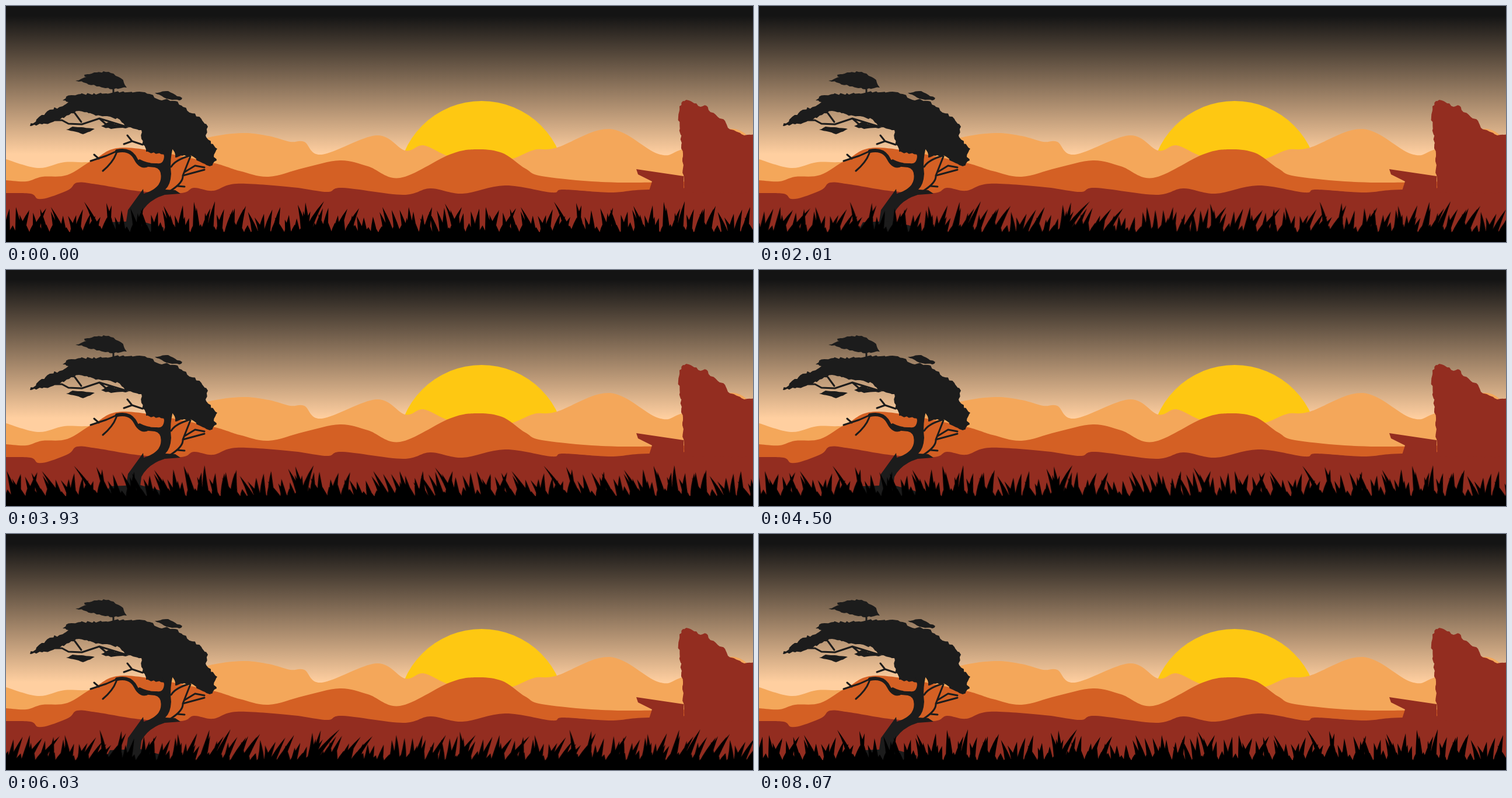
These frames come from a looping animation (1280x405 px, 8100 ms). An HTML page:

```html
<!DOCTYPE html>
<html lang="en">
<head>
<meta charset="utf-8">
<title>Savanna sunset</title>
<style>
  html, body { margin: 0; width: 100%; height: 100%; overflow: hidden; background: #000; }
  svg { display: block; width: 100%; height: 100%; }
  #tree { fill: #1c1c1c; }
  .twigs { fill: none; stroke: #1c1c1c; stroke-width: 3; stroke-linecap: round; stroke-linejoin: round; }
  #grass { transform-origin: 0 420px; animation: sway 8100ms -7990ms ease infinite; }
  @keyframes sway {
    0%, 100% { transform: skewX(0deg); }
    25% { transform: skewX(-14.6deg); }
    50% { transform: skewX(12deg); }
    75% { transform: skewX(-17.6deg); }
  }
</style>
</head>
<body>
<svg viewBox="0 0 1280 405" preserveAspectRatio="none">
  <defs>
    <linearGradient id="sky" gradientUnits="userSpaceOnUse" x1="0" y1="17" x2="0" y2="254">
      <stop offset="0" stop-color="#141414"/>
      <stop offset="1" stop-color="#ffcfa0"/>
    </linearGradient>
  </defs>
  <rect width="1280" height="405" fill="url(#sky)"/>
  <circle cx="815" cy="307" r="144" fill="#fec812"/>
  <path id="far" fill="#f4a75a"/>
  <path id="mid" fill="#d46024"/>
  <g fill="#932d20">
    <path id="near"/>
    <path id="rock"/>
    <path d="M1080 280L1161 292V320H1101L1107 301L1083 289Z"/>
  </g>

  <g id="tree">
    <path id="canopy"/>
    <path id="crown"/>
    <path id="tuft"/>
    <path id="spray"/>
    <path id="sprig"/>
    <path d="M204 382L209 350L235 314L236 322Q262 314 265 298Q268 280 255 277Q236 277 224 266L229 263
      Q244 271 259 270Q270 272 271 258L267 240H287Q280 262 283 288Q282 307 273 315L290 316L299 322
      L272 324Q243 333 232 355L228 386Z"/>
    <path d="M160 405L178 371L230 369L270 380V405Z"/>
    <g class="twigs">
      <path stroke-width="6" d="M190 249Q213 244 222 262T245 272"/>
      <path d="M145 266L172 257L190 249Q186 266 166 283M151 255L159 262M184 141V151"/>
      <path d="M282 317Q304 303 303 291L316 258M303 291L340 281M306 285L324 274L340 277"/>
      <path d="M283 276Q290 264 315 257M294 309L306 310M202 237L216 232L234 238M208 222L216 232"/>
      <path d="M75 196H96L107 202L130 203L160 193L206 207M118 184L129 199M160 193L176 207"/>
    </g>
  </g>

  <g id="grass">
    <rect x="-300" y="388" width="1900" height="40"/>
    <path id="turf"/>
    <use href="#turf" x="805"/>
    <use href="#turf" x="-805"/>
  </g>
</svg>

<script>
const set = (id, d) => document.getElementById(id).setAttribute('d', d);
const parse = text => text.trim().split(/\s+/).map(p => p.split(',').map(Number));

let seed = 41;
const rand = () => (seed = (seed * 16807) % 2147483647) / 2147483647;

// Smooth skyline through a few points, filled down to the ground.
function ridge(text) {
  const p = parse(text), k = .17;
  let d = `M-9 405L${p[0]}`;
  for (let i = 0; i < p.length - 1; i++) {
    const a = p[i - 1] || p[i], b = p[i], c = p[i + 1], e = p[i + 2] || c;
    d += `C${b[0] + (c[0] - a[0]) * k} ${b[1] + (c[1] - a[1]) * k} `
       + `${c[0] - (e[0] - b[0]) * k} ${c[1] - (e[1] - b[1]) * k} ${c}`;
  }
  return d + 'V405Z';
}

// Closed outline with small random nicks along each edge.
function ragged(text, size) {
  const p = parse(text);
  return 'M' + p.map(([x, y], i) => {
    const [u, v] = p[(i + 1) % p.length];
    const steps = Math.ceil(Math.hypot(u - x, v - y) / 5);
    let d = '';
    for (let s = 0; s < steps; s++) {
      const t = s / steps, nick = () => s ? (rand() - .5) * size : 0;
      d += `${x + (u - x) * t + nick()} ${y + (v - y) * t + nick()} `;
    }
    return d;
  }).join('L') + 'Z';
}

set('far', ridge(`0,263 55,278 100,268 150,267 260,251 345,226 405,218 450,223 487,233 511,233
  541,255 635,222 684,248 715,239 756,257 815,275 868,262 905,247 944,243 1035,211 1118,254
  1158,246 1240,211 1280,230`));
set('mid', ridge(`0,299 35,301 62,293 105,290 150,264 205,243 345,267 400,283 450,293 510,278
  572,265 620,275 675,295 760,255 805,246 850,252 890,279 925,293 1060,303 1280,297`));
set('near', ridge(`0,321 42,322 55,331 75,328 108,315 122,303 155,306 230,318 300,321 322,312
  355,317 395,305 490,311 550,319 577,312 680,324 727,313 782,322 855,308 935,320 955,315
  1037,320 1102,315 1280,315`));

set('rock', ragged(`1161,320 1160,258 1152,190 1154,172 1160,163 1170,162 1190,173 1200,171
  1207,182 1232,197 1237,209 1265,222 1290,219 1290,320`, 3));
set('canopy', ragged(`41,206 57,190 75,178 97,172 107,165 97,162 112,153 185,148 238,148 258,159
  290,163 303,173 335,194 346,207 343,225 362,245 356,259 361,265 349,275 316,256 290,260 284,244
  272,255 240,250 232,228 232,213 205,208 195,195 150,186 125,180 108,187 90,196 62,203`, 4));
set('crown', ragged('119,128 138,122 134,118 156,114 176,113 197,124 207,140 183,143 160,138', 3));
set('tuft', ragged('255,149 278,146 302,158 297,162 275,159', 2));
set('spray', ragged('103,212 114,207 152,211 132,220', 2));
set('sprig', ragged('163,206 176,199 214,209 180,211', 2));

// Curved blade: tip, sideways lean from the root, half width.
function blade(x, y, lean, w) {
  const root = x - lean, bend = root + lean * .28, half = (y + 391) / 2;
  return `M${root - w} 391Q${bend - w * .72} ${half} ${x} ${y}`
       + `Q${bend + w * .72} ${half + 3} ${root + w} 391Z`;
}

// The most striking blades; the rest fill the row at random.
const tall = parse(`17,345,-5 40,350,14 69,347,20 77,345,-19 134,336,-25 172,338,-9 181,342,8
  235,346,10 270,343,-16 303,342,4 322,336,-4 358,335,9 389,349,9 411,343,14 470,345,9 500,341,-12
  513,337,-3 545,335,29 585,348,17 605,347,19 645,345,-14 690,345,-3 730,345,10 752,339,-20
  781,345,17`);
let turf = tall.map(([x, y, lean]) => blade(x, y, lean, 6.2)).join('');
for (let x = 0; x < 805; x += 11.5) {
  turf += blade(x + rand() * 8, 346 + rand() * 22, (rand() - .5) * 26, 5.8);
  turf += blade(x, 371 + rand() * 9, 0, 7);
}
set('turf', turf);
</script>
</body>
</html>
```
